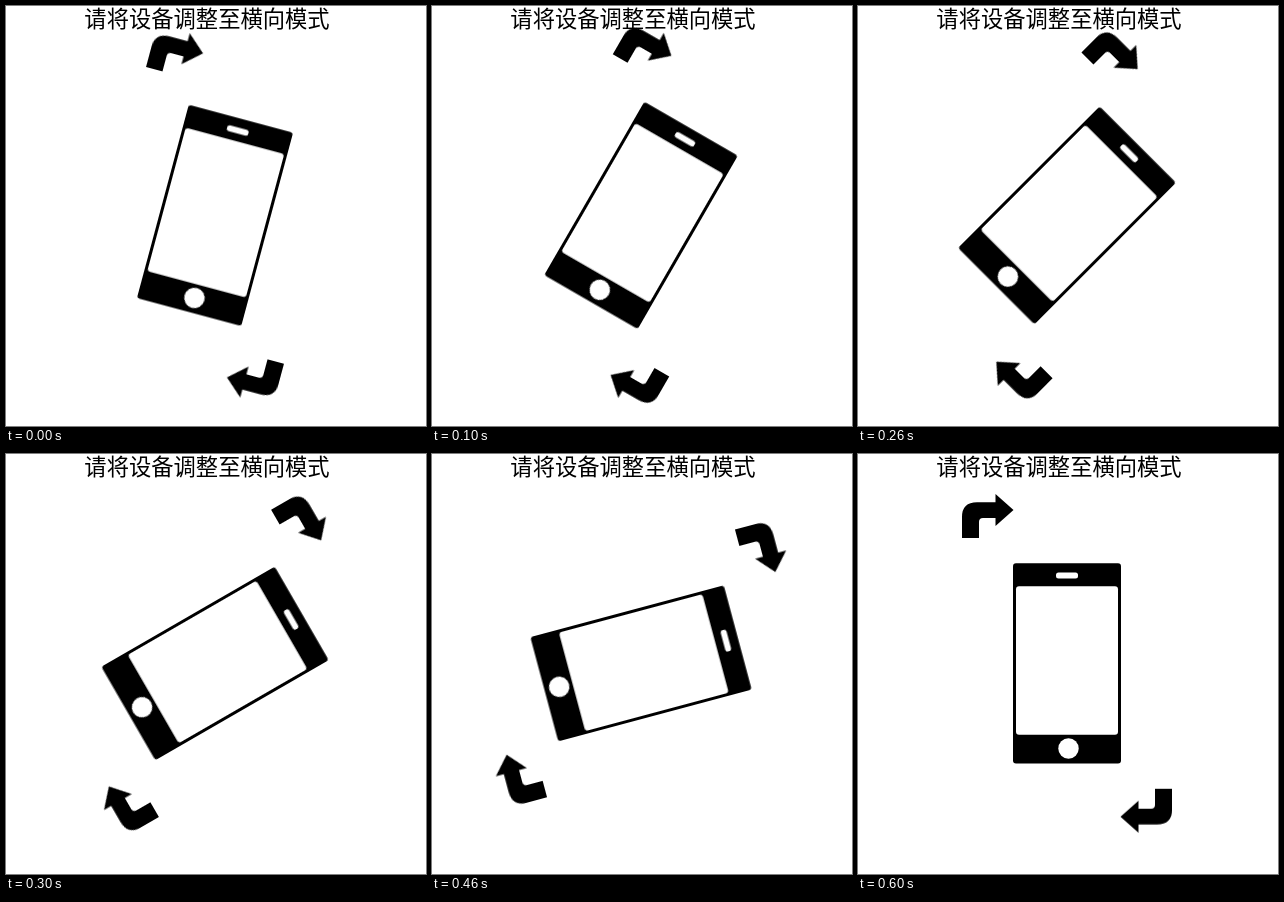
An HTML page that plays this animation: 420 px wide and 420 px high, repeating every 0.7 s.

```html
<!DOCTYPE html>
<html lang="zh-CN">
<head>
<meta charset="utf-8">
<title>请将设备调整至横向模式</title>
<style>
  html, body { margin: 0; width: 100%; height: 100%; overflow: hidden; background: #fff; }
  svg { display: block; width: 420px; height: 420px; }
  text { font: 22.3px "Noto Sans CJK SC", "Noto Sans CJK", sans-serif; text-anchor: middle; }
  #device { transform-origin: 209px 209.4px; }
</style>
</head>
<body>
<svg viewBox="0 0 420 420">
  <defs>
    <path id="arrow" d="M104 84V63Q104 48.3 119 48.3H137.5V40L155.5 56L137.5 72V64H125Q121 64 121 68V84Z"/>
  </defs>
  <text x="201" y="21">请将设备调整至横向模式</text>
  <g id="device">
    <use href="#arrow"/>
    <use href="#arrow" transform="rotate(180 209 209.4)"/>
    <rect x="155" y="109.3" width="108" height="200.2" rx="3"/>
    <g fill="#fff">
      <rect x="158" y="132.3" width="102" height="148.5" rx="3"/>
      <rect x="198" y="118.5" width="22" height="6" rx="2.5"/>
      <circle cx="210.5" cy="294.5" r="10.2"/>
    </g>
  </g>
</svg>
<script>
  const STEP = 100;
  const angles = [15, 30, 45, 60, 75, 90, 0];

  // Each pose is held for one step, then jumps to the next.
  const poses = angles.map((deg, i) => ({
    offset: i / angles.length,
    transform: `rotate(${deg}deg)`,
    easing: 'step-end'
  }));
  poses.push({ offset: 1, transform: `rotate(${angles[0]}deg)` });

  document.getElementById('device').animate(poses, {
    duration: STEP * angles.length,
    iterations: Infinity
  });
</script>
</body>
</html>
```
